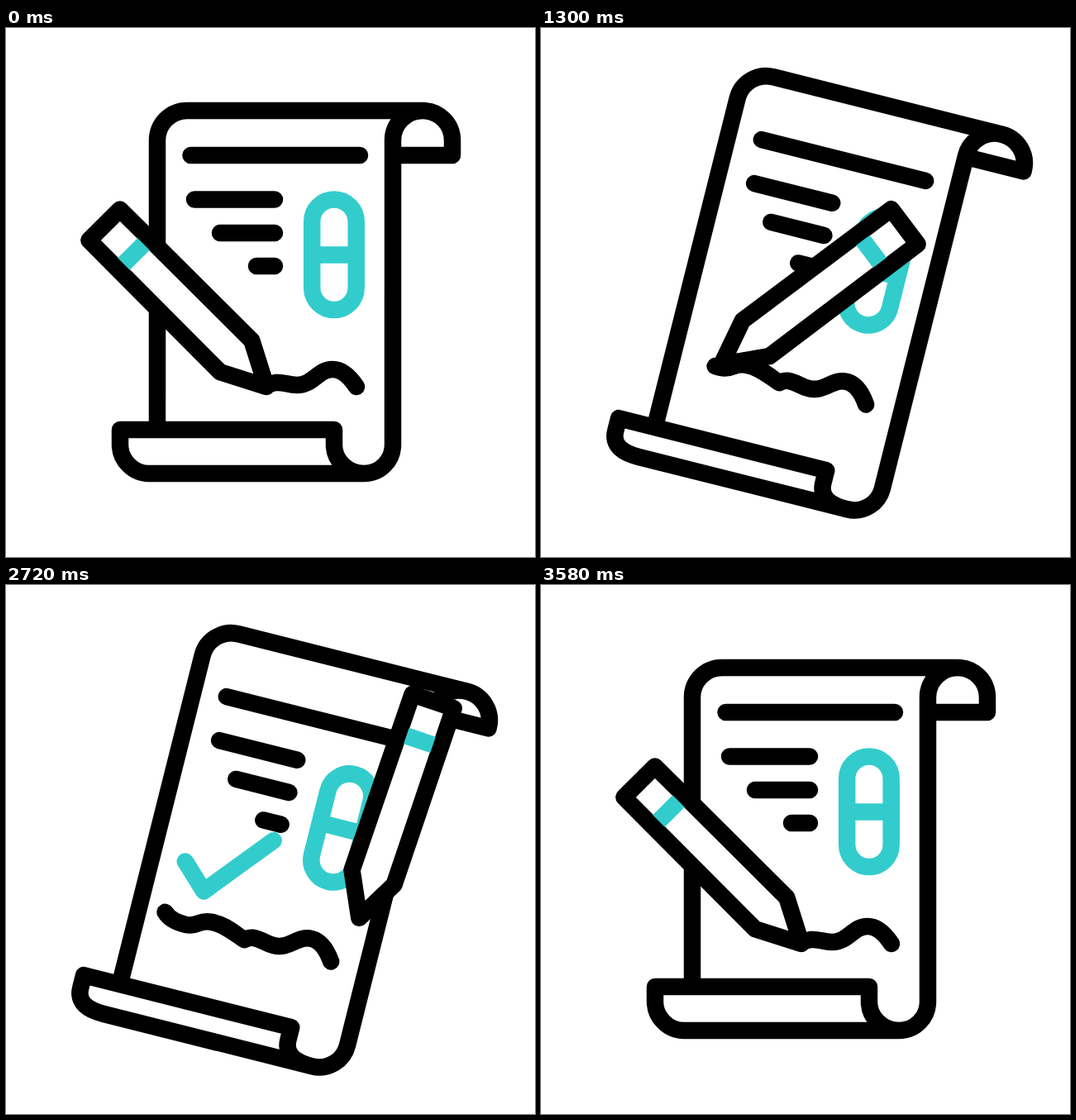
An HTML page that plays this animation: 640 px wide and 640 px high, repeating every 3.6 s.

```html
<!DOCTYPE html>
<html lang="en">
<head>
<meta charset="utf-8">
<title>Signing a prescription</title>
<style>
  html, body { margin: 0; width: 100%; height: 100%; overflow: hidden; background: #fff; }
  svg { display: block; width: 100vw; height: 100vh; }
  path, rect { fill: none; stroke: #000; stroke-width: 20.5; stroke-linecap: round; stroke-linejoin: round; }
  .teal { stroke: #3cc; }
  .flat { stroke-linecap: butt; }
  .fill { fill: #fff; }
</style>
</head>
<body>
<svg viewBox="0 0 640 640">
  <g id="sheet">
    <path id="outline" class="flat"/>
    <path d="M223.5 154H428M228 207.5H325M259 248H325M303 288H325"/>
    <rect class="teal" x="370.2" y="207.5" width="53.5" height="133.5" rx="26.75"/>
    <path class="teal flat" d="M370 274.5H424"/>
    <path id="sign" d="M424 434C414 419 405 413 395 413C377 413 372 432 352 432C341 432 336 428 326 429C320 430 316 434 316 434C304 430 287 421 272 423C257 423 258 433 243 433.5C229 434 221 431 215 425"/>
    <path id="check" class="teal" d="M223.5 359.5L254 389L321 309"/>
  </g>
  <g id="pen">
    <path class="fill" d="M-26.5 -277H26.5L27 -52L0 0L-27 -52Z"/>
    <path class="teal flat" d="M-17 -227H17"/>
  </g>
</svg>
<script>
const LOOP = 3600;
const [sheet, outline, sign, check, pen] =
  ['sheet', 'outline', 'sign', 'check', 'pen'].map(id => document.getElementById(id));

const mix = (a, b, p) => a + (b - a) * p;
const clamp = p => Math.min(1, Math.max(0, p));
const linear = p => p;
const smooth = p => p * p * (3 - 2 * p);
const span = (t, from, to, ease = linear) => ease(clamp((t - from) / (to - from)));

// time, tip x, tip y, angle, easing towards this pose
const poses = [
  [0, 315, 434, -45, linear],
  [480, 315, 434, -8, smooth],
  [1300, 218.5, 407, 53, linear],
  [1510, 196, 388, 58, linear],
  [1820, 211, 335, 38.4, smooth],
  [2042, 238, 367, 34, linear],
  [2420, 305, 316, 27, linear],
  [2550, 324, 307, 24, linear],
  [2860, 503, 473, 15, smooth],
  [3580, 315, 434, -45, smooth],
];

function penPose(t) {
  const i = poses.findIndex(p => p[0] > t);
  if (i < 0) return poses[poses.length - 1].slice(1, 4);
  const a = poses[i - 1], b = poses[i];
  const p = span(t, a[0], b[0], b[4]);
  return [1, 2, 3].map(k => mix(a[k], b[k], p));
}

// The scroll grows taller and its curls flatten as s goes from 0 to 1
function scrollPath(s) {
  const top = mix(100, 77, s), curl = top + 36, lip = mix(154, 114, s);
  const base = mix(539, 562.5, s), fold = mix(504, 538.5, s), rim = mix(486, 523, s);
  return `M183 ${rim}V${top + 36}C183 ${top + 16} 199 ${top} 219 ${top}H504` +
    `C524 ${top} 540 ${curl - 20} 540 ${curl}V${lip}H468` +
    `M504 ${top}C484 ${top} 468 ${curl - 20} 468 ${curl}V${base - 35}` +
    `C468 ${base - 16} 453 ${base} 433 ${base}C413 ${base} 397 ${fold + 19} 397 ${fold}` +
    `V${rim}H138V${fold}C138 ${fold + 19} 154 ${base} 173 ${base}H433`;
}

function lift(t) {
  if (t < 490) return 5.4 * smooth(t / 490);
  if (t < 2609) return 2.7 * (1 + Math.cos(2 * Math.PI * (t - 490) / 326));
  return 0;
}

function reveal(path, part) {
  const len = path.getTotalLength();
  path.style.visibility = part > 0.001 ? 'visible' : 'hidden';
  path.style.strokeDasharray = `${len * part} ${len * 2}`;
}

function draw(t) {
  const s = span(t, 0, 470, smooth) - span(t, 2910, 3580, smooth);
  sheet.setAttribute('transform', `translate(0 ${-0.4 * s - lift(t)}) rotate(${14.1 * s} 320 320)`);
  outline.setAttribute('d', scrollPath(s));
  reveal(sign, 0.5 + 0.5 * (span(t, 480, 1510) - span(t, 2850, 3580, smooth)));
  reveal(check, span(t, 1842, 2540) - span(t, 2900, 3560, smooth));
  const [x, y, angle] = penPose(t);
  pen.setAttribute('transform', `translate(${x} ${y}) rotate(${angle})`);
}

function tick() {
  draw(performance.now() % LOOP);
  requestAnimationFrame(tick);
}
tick();
</script>
</body>
</html>
```
